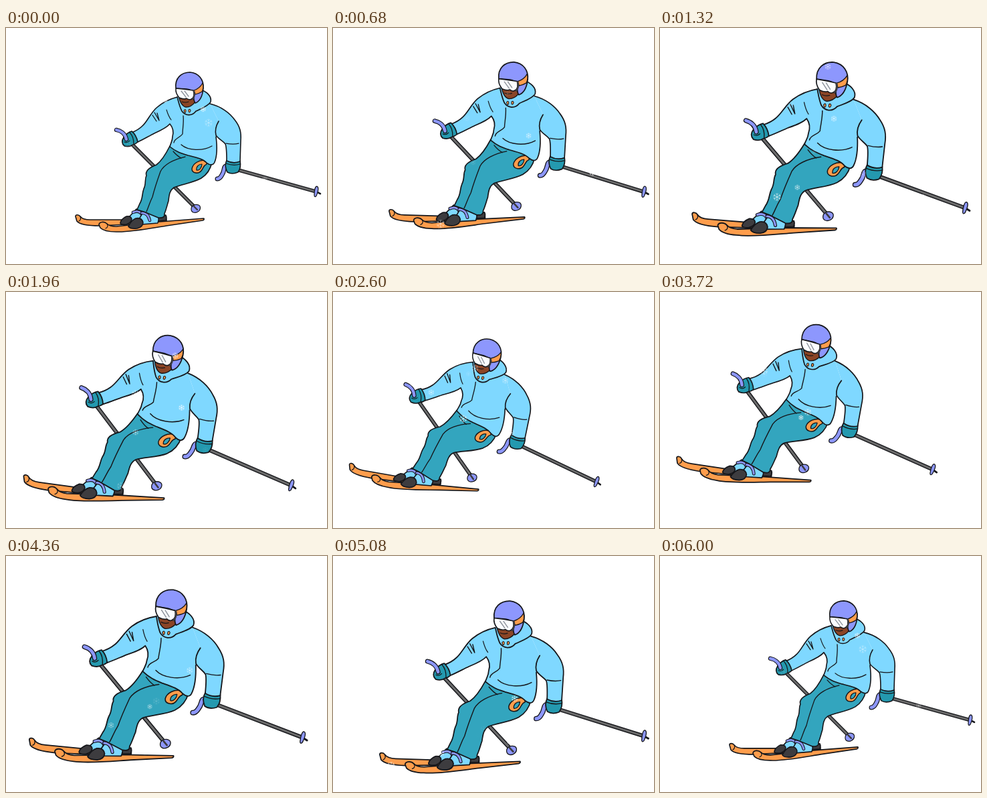
An HTML page with a canvas that plays this animation: 480 by 352 pixels, repeating every 6040 ms.

```html
<!DOCTYPE html>
<html lang="en">
<head>
<meta charset="utf-8">
<title>Skier</title>
<style>
  html, body { margin: 0; width: 100%; height: 100%; overflow: hidden; background: #fff; }
  canvas { display: block; }
</style>
</head>
<body>
<canvas id="stage" width="480" height="352"></canvas>
<script>
const LOOP = 6040, STEP = 40, W = 480, H = 352, TAU = Math.PI * 2;
const ctx = document.getElementById('stage').getContext('2d');
ctx.lineJoin = ctx.lineCap = 'round';

const INK = '#15161a', SKY = '#7fd8ff', TEAL = '#33a5be', GLOVE = '#2499af',
      VIOLET = '#8d97fd', ORANGE = '#ff9d4c', SKIN = '#8b4526', DARK = '#3d3c3f', GREY = '#6c6c6c';

const part = (d, fill, line, color = INK) => ({ path: new Path2D(d), fill, line, color });
const shape = (fill, d, line = 1.6) => part(d, fill, line);
const line = (d, width = 1.3, color) => part(d, null, width, color);
const tube = (color, d, wide, core) => [line(d, wide), line(d, core, color)];

const torso = 'M256 103 C244 106 233 112 225 119 C216 127 211 140 204 146 C198 152 193 154 188 156 ' +
  'Q190 166 197 170 C206 166 214 161 222 157 C231 153 240 149 245 143 C250 149 251 155 249 162 ' +
  'C249 169 246 172 245 177 C255 185 262 187 272 190 C284 193 294 195 300 201 C305 205 310 205 312 200 ' +
  'C316 190 316 178 314 162';

const leftPole = [
  tube(GREY, 'M186 171 L283 268', 5.4, 2.8),
  shape(VIOLET, 'M277 270 C277 265 283 262 288 264 C292 266 291 272 287 274 C282 277 277 275 277 270 Z', 1.2),
  line('M281 266 L286 271', 2.4, DARK)
];

const skis = [
  shape(ORANGE, 'M104 281 C104 278 109 278 111 281 C114 285 119 286 126 286 L190 286 L240 285 L240 290 L140 295 C125 295 110 293 106 288 Z'),
  shape(ORANGE, 'M139 293 C140 289 147 288 151 292 C154 295 158 296 165 296 L230 289 L296 284 Q297 286 294 287 L240 295 C215 299 185 305 165 304 C152 304 144 301 141 298 Z'),
  line('M151 292 Q154 297 149 299', 1.2),
  line('M111 281 Q113 286 109 288', 1.2)
];

const boots = [
  shape(DARK, 'M226 281 L239 279 Q241 283 239 287 L228 288 Z'),
  shape(SKY, 'M195 270 L213 276 L205 290 L188 289 L184 282 Z'),
  shape(DARK, 'M171 291 Q172 285 180 281 Q187 280 188 285 Q188 290 180 293 Q172 294 171 291 Z'),
  tube(VIOLET, 'M190 275 Q199 271 203 278', 4.6, 2.6),
  shape(SKY, 'M206 273 L228 280 Q229 286 227 291 L203 293 L198 287 Z'),
  shape(DARK, 'M183 296 Q187 287 194 284 Q203 282 205 290 Q205 297 196 299 Q186 300 183 296 Z'),
  tube(VIOLET, 'M203 276 Q212 275 215 287', 4.6, 2.6)
];

const trousers = [
  shape(TEAL, 'M245 176 C240 186 233 198 225 204 C212 209 208 214 210 220 C207 226 210 232 206 240 C203 248 205 254 200 262 L196 271 L206 274 L228 283 Q238 284 237 277 C240 270 241 264 243 258 C244 248 245 242 251 238 C262 233 280 231 292 224 C300 219 306 210 308 200 L280 180 Z'),
  line('M268 192 C250 196 236 204 231 214 C226 228 222 240 219 252 C214 262 213 268 210 274'),
  line('M250 184 Q256 191 262 194', 1.2),
  shape(ORANGE, 'M300 198 C289 195 279 203 278 210 C278 217 288 218 292 213 C296 208 295 205 300 203 Z', 1.4),
  shape(TEAL, 'M293 203 C288 203 284 207 285 212 C289 213 293 208 293 203 Z', 1.2)
];

const rightPole = [
  tube(GREY, 'M345 211 L464 244', 5.4, 2.8),
  line('M464 244 L470 247', 2.6),
  shape(VIOLET, 'M465 236 C468 237 467 243 465 248 C464 252 461 253 461 249 C461 244 462 236 465 236 Z', 1.2),
  tube(VIOLET, 'M332 206 C324 204 328 212 323 219 Q320 225 316 225', 7, 4.6)
];

const jacket = [
  shape(SKY, torso + ' L318 139 L305 113 Z', 0),
  line(torso, 1.6),
  rightPole,
  shape(GLOVE, 'M330 197 Q340 202 350 198 Q352 208 347 215 Q338 219 331 215 Q326 206 330 197 Z'),
  line('M329 202 Q340 206 350 203', 1.2),
  shape(SKY, 'M305 113 C322 117 335 127 342 137 C350 147 352 156 351 168 L350 199 Q340 203 330 198 C330 186 330 178 328 173 C324 168 318 166 314 160 C312 152 315 144 318 139'),
  line('M329 172 Q340 174 348 172', 1.2),
  shape(SKY, 'M288 91 C300 94 308 102 306 110 C303 116 292 120 284 124 C278 132 268 131 263 124 C259 116 258 110 256 103'),
  line('M265 131 C266 142 264 150 264 158 C260 164 252 164 251 171'),
  line('M262 174 C272 183 294 184 308 176'),
  line('M219 130 L225 139 M222 126 L229 138 L226 127'),
  line('M240 122 Q243 132 247 137', 1.1),
  shape(ORANGE, 'M266 123 Q268 120 269 123 Q269 127 267 126 Z', 1),
  shape(ORANGE, 'M273 122 Q275 120 276 123 Q275 127 273 125 Z', 1)
];

const head = [
  shape(SKIN, 'M258 101 Q264 105 279 103 L283 110 Q277 118 269 118 Q261 116 258 101 Z', 1.3),
  shape(VIOLET, 'M254 90 C252 75 262 66 275 66 C288 67 296 77 295 90 C294 100 291 109 283 112 Q280 108 281 100 Q282 93 270 91 Z'),
  shape(ORANGE, 'M281 93 Q290 90 294 82 Q296 89 293 95 Q288 98 283 99 Z', 1.2),
  shape('#fbfdff', 'M254 90 Q266 91 280 93 Q283 103 277 106 Q274 108 270 105 Q266 107 259 104 Q253 97 254 90 Z', 1.5),
  line('M281 94 Q283 102 279 106', 2.4, DARK),
  line('M262 94 L269 103 M267 94 L273 102', 1.3, '#8c929b'),
  line('M263 110 Q268 112 273 110', 1.1)
];

const leftHand = [
  shape(GLOVE, 'M176 163 Q171 171 177 176 Q185 178 190 174 Q194 173 197 170 Q195 160 188 154 Q181 156 176 163 Z'),
  line('M185 156 Q191 162 191 173', 1.2),
  line('M177 170 Q182 172 185 168', 1.1),
  tube(VIOLET, 'M165 152 C171 153 178 157 180 166', 6.4, 4.2)
];

const skier = [leftPole, skis, boots, trousers, jacket, head, leftHand].flat(Infinity);

// One wide swing per loop, with two rises towards the viewer
const swing = t => (1 - Math.cos(TAU * t / LOOP)) / 2;

function placeSkier(t) {
  const a = TAU * t / LOOP, near = Math.sin(a) ** 2, s = swing(t);
  const hipX = 245, hipY = 176, zoom = 1 + 0.134 * near;
  ctx.translate(hipX - 62 * s - 4 * near, hipY - 9 * s + 4 * near - 10.5 * Math.sin(2 * a));
  ctx.rotate(0.177 * swing(t + 100));
  ctx.scale(zoom, zoom);
  ctx.translate(-hipX, -hipY);
}

function drawPart({ path, fill, line, color }) {
  if (fill) {
    ctx.fillStyle = fill;
    ctx.fill(path);
  }
  if (line) {
    ctx.strokeStyle = color;
    ctx.lineWidth = line;
    ctx.stroke(path);
  }
}

const random = n => {
  const v = Math.sin(n * 12.9898) * 43758.5453;
  return v - Math.floor(v);
};

const arm = new Path2D('M0 0 V-1 M-.3 -.9 L0 -.6 L.3 -.9');

// White snow falls one stage height per loop and shows only over the skier
function drawFlake(i, t) {
  const u = t / LOOP, r = 3 + 3 * random(i + 200);
  ctx.save();
  ctx.translate(W * random(i) + 8 * Math.sin(TAU * (u + random(i))), H * ((random(i + 100) + u) % 1));
  ctx.scale(r, r);
  ctx.globalAlpha = 0.6 * Math.sin(TAU * (u + random(i + 300))) ** 2;
  ctx.strokeStyle = '#fff';
  ctx.lineWidth = 0.9 / r;
  for (let k = 0; k < 6; k++) {
    ctx.stroke(arm);
    ctx.rotate(TAU / 6);
  }
  ctx.restore();
}

function draw(t) {
  ctx.fillStyle = '#fff';
  ctx.fillRect(0, 0, W, H);
  ctx.save();
  placeSkier(t);
  skier.forEach(drawPart);
  ctx.restore();
  for (let i = 1; i <= 30; i++) drawFlake(i, t);
}

const start = performance.now();
function tick() {
  const t = (performance.now() - start) % LOOP;
  draw(Math.floor(t / STEP) * STEP);
  requestAnimationFrame(tick);
}
tick();
</script>
</body>
</html>
```
